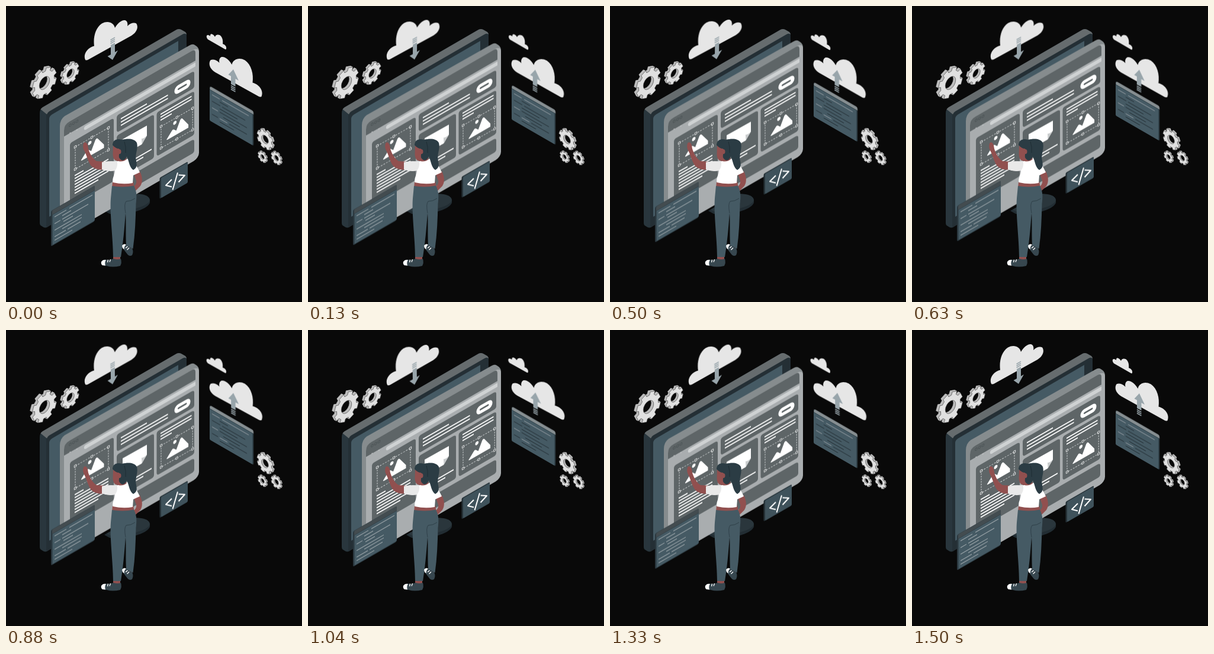
These frames come from a looping animation (500 px wide and 500 px high, 1540 ms). An HTML page:

```html
<!DOCTYPE html>
<html lang="en">
<head>
<meta charset="utf-8">
<title>Web design</title>
<style>
html, body { margin: 0; width: 100%; height: 100%; overflow: hidden; background: #090909; }
svg { display: block; width: 100vw; height: 100vh; }
.float { animation: float 1540ms linear infinite; }
.wind { animation: wind 1540ms linear infinite; transform-origin: 282px 89px; }
@keyframes float {
  0%, 97.4%, 100% { transform: translateY(0); }
  48.7% { transform: translateY(-10px); }
}
@keyframes wind {
  0%, 97.4%, 100% { transform: rotate(0deg); }
  24.35% { transform: rotate(1deg); }
  73.05% { transform: rotate(-1deg); }
}
.line { fill: none; stroke: #fff; stroke-width: 2; }
.card { fill: #5e6567; }
.skin { fill: #91504f; }
.dash { fill: none; stroke: #dfe2e3; stroke-width: .9; stroke-dasharray: 2.6 1.8; }
.knob { fill: #5e6567; stroke: #fff; stroke-width: .7; }
</style>
</head>
<body>
<svg viewBox="0 0 500 500">
  <defs>
    <path id="cloud" d="M134 91C130 83 136 71 149 67.500C147 53 151 37 162 29.500C172 24 182 28 184 37C188 29 196 23 201 24C205 25 206 30 205 34C211 28 219 27 221 31C224 38 219 46 212 50L140 90Q136 92.500 134 91z"/>
    <g id="pick">
      <rect class="dash" width="56" height="37.5"/>
      <path class="knob" d="M-1.7-1.7h3.4v3.4h-3.4zM26.3-1.7h3.4v3.4h-3.4zM54.3-1.7h3.4v3.4h-3.4zM-1.7 35.8h3.4v3.4h-3.4zM26.3 35.8h3.4v3.4h-3.4zM54.3 35.8h3.4v3.4h-3.4z"/>
      <g fill="#fff">
        <circle cx="24.5" cy="7.5" r="3"/>
        <path d="M10 28L19 18.500Q21 16.500 23 18.500L27 22.500L34 8Q36 5 38 8L48.500 24V29.500H12Q9 29.500 10 28z"/>
      </g>
    </g>
  </defs>

  <g id="gears"></g>

  <g class="wind">
    <g fill="#e6e6e6">
      <use href="#cloud"/>
      <use href="#cloud" transform="translate(565.5 62) scale(-1 1)"/>
      <use href="#cloud" transform="translate(422 38) scale(-.375 .385)"/>
    </g>
    <g fill="#98a5ab" stroke="#98a5ab">
      <path stroke="none" d="M177 66L184 62V78L189 75L180 91L171.500 85L177 82z"/>
      <path stroke-width="1.500" d="M176.500 57.500l7.500-4.300m-7.500 7.300l7.500-4.300m-7.500 7.300l7.500-4.300"/>
      <path stroke="none" d="M380 132L387.500 136V123L393 126L384 107L375.500 116L380 118.500z"/>
      <path stroke-width="1.500" d="M380 134.500l7.500 4.300m-7.500-1.300l7.500 4.300m-7.500-1.300l7.500 4.300"/>
    </g>
  </g>

  <!-- monitor -->
  <path fill="#29363d" d="M57 181Q57 174 62 171L288 40Q292 38 296 40L303 44Q305 46 305 50V232L72 372Q68 376 63 373.500L59 371Q57 370 57 366z"/>
  <path fill="#242f35" d="M68 185Q68 180 73 177L299 47Q305 44 305 52V232L72 372Q69 374 68 373z"/>
  <path fill="#666c6e" d="M58.500 174.500Q60 172 62 171L288 40Q292 38 296 40L303 44Q305 46 305 48Q302 45.500 298 48L73 178Q70 180 69 183z"/>
  <path fill="#455a64" d="M73 191Q73 186 78 183L291 59V230L73 356z"/>
  <path fill="#222d33" d="M166 346L215 318Q242 317 243 328V332Q241 341 216 348Q190 355 175 351z"/>
  <path fill="#2a363c" d="M170 344L215 317Q242 317 243 328Q241 337 214 343Q190 349 175 347z"/>

  <g class="float">
    <!-- browser window -->
    <path fill="#868c8e" d="M91 203Q91 192 99 186L310 66.500Q315 63.500 319 66L322 68Q326 71 326 77V242L104 380L91 372z"/>
    <g transform="matrix(1 -.577 0 1 0 0)">
      <rect x="98" y="257" width="228" height="188" rx="9" fill="#a9adaf"/>
      <path class="card" d="M98 277V267Q98 257 107 257H314Q320 257 320 264V277z"/>
      <path stroke="#cfd2d3" stroke-width="6.500" d="M135 283.500H320"/>
      <circle cx="135" cy="283.500" r="3.250" fill="#cfd2d3"/>
      <g fill="none" stroke="#4a5254" stroke-width=".8">
        <circle cx="108.500" cy="264" r="1.900"/><circle cx="114.200" cy="264" r="1.900"/><circle cx="119.900" cy="264" r="1.900"/>
      </g>
      <path stroke="#c6c9ca" stroke-width="1.500" d="M107.500 277h1.500M119 278.500h1.500"/>
      <rect class="card" x="108" y="294" width="74" height="107" rx="4"/>
      <rect class="card" x="187" y="293" width="131" height="29" rx="4"/>
      <rect class="card" x="187" y="327" width="63" height="74" rx="4"/>
      <rect class="card" x="254.500" y="327" width="63.500" height="74" rx="4"/>
      <rect class="card" x="187" y="408" width="131" height="23" rx="4"/>
      <path class="line" d="M194 302.500h44M194 308.200h79.500M194 313.800h79.500M261 333.500h52.500M261 338.500h52.500M261 343.500h19M116 353.500h15M116 358.500h57M116 363.500h57M116 368.500h57M116 373.500h57M116 378.500h57M116 383.500h40M196 384h50M196 389h36"/>
      <rect x="284.500" y="301.500" width="27" height="14" rx="6.500" fill="#fff"/>
      <path stroke="#5e6567" stroke-width="3" stroke-linecap="round" d="M291.500 308.500h12.500"/>
      <use href="#pick" x="117" y="305.500"/>
      <use href="#pick" transform="translate(262 354.500) scale(.95 .975)"/>
    </g>
    <path fill="#fff" d="M197 225L238 202V219L229 234L197 252z"/>
    <path fill="#c9cccd" d="M238 218L229.500 234L229 224Q234 224 238 218z"/>

    <!-- left code panel -->
    <g transform="matrix(1 -.577 0 1 0 0)">
      <rect x="76" y="390" width="74" height="60" rx="2.500" fill="#2b383f"/>
      <path fill="#455a64" d="M78.500 398H150V446.500Q150 449 148 449H78.500z"/>
      <path fill="#434c50" d="M78 397.500V392Q78 390.500 80 390.500H148Q150 390.500 150 393V397.500z"/>
      <path fill="none" stroke="#929da2" stroke-width="1.400" d="M82 403.500h20M107 403.500h39M95 409h15M82 415h10M95 415h44M97 420h16M82 426h15M97 426h31M95 431h33M82 437h19M104 437h22M82 443h30"/>
    </g>

    <!-- code tile -->
    <g transform="matrix(1 -.577 0 1 0 0)">
      <rect x="259.500" y="440" width="47.500" height="35.500" rx="2" fill="#263238"/>
      <rect x="262" y="441.500" width="45" height="34" rx="1.500" fill="#3f525b"/>
    </g>
    <path class="line" stroke-linejoin="round" d="M280 293L270 303L280 305.500M281.500 310.500L290 281.500M291.500 285.500L302 286L291.500 297.500"/>

    <!-- right code panel -->
    <g transform="matrix(1 .577 0 1 0 0)">
      <rect x="344" y="-63" width="74" height="58" rx="2.500" fill="#33444c"/>
      <path fill="#455a64" d="M344 -57H416V-5H346Q344 -5 344 -7z"/>
      <path fill="#868e91" d="M344.500 -58V-61Q345 -63.500 347 -63.500H416Q418 -63.500 418 -61V-58z"/>
      <path fill="none" stroke="#7f8b91" stroke-width="1.300" d="M348 -51h13M365 -51h45M348 -29h10M361 -18h13"/>
      <path fill="none" stroke="#222d33" d="M361 -46h14M348 -40h14M365 -40h39M361 -34.500h30M361 -29h46M367 -23.500h28M348 -18h10M377 -18h30M361 -12.500h24"/>
    </g>
  </g>

  <!-- woman -->
  <path class="skin" d="M130.500 234C131 229.500 135 229 137 233C139 236 138 240 140 244C143 252 147 258 153 262L167 263V276C157 278 148 275 143 269C138 261 136 251 132 244C130 240 130 237 130.500 234z"/>
  <path class="skin" d="M216 284L226 279C231 289 231 298 227 304L217 314L212 308C218 304 221 300 220 295z"/>
  <path class="skin" d="M180 297H215L217 307H179zM181 421h12v9h-12zM203 402l11 4-2 9-9-5z"/>
  <path fill="#455a64" d="M179 304Q198 307 216 303.500C221 313 221 322 219.500 334C219 360 218 385 214.500 410L203 404C202 385 203 366 202 350C200 375 198 400 194 424H181C181 395 175 350 177 325z"/>
  <path fill="none" stroke="#2f4049" d="M218 325Q211 330 203 330Q199 334 202 350"/>
  <path class="skin" d="M181 235L180.500 251Q181 261 188 261.500L189 267L205 265L201 248L191 234z"/>
  <path fill="#fff" d="M162 264C172 261.500 182 263 190 262Q198 264 205 258C214 259 220 268 226 281L215 286L214 299Q198 302 180.500 298C179 290 184 285 184 278Q172 280 162 276z"/>
  <path fill="#e9e9e9" d="M162 264Q175 261 188 263Q189 272 184 278Q172 280 162 276z"/>
  <path fill="#2b3c44" d="M180 235C180 226 188 223 196 226C205 224 216 223 221 231C224 242 217 250 220 262C221 268 222 273 215 277C208 272 208 262 204 254C201 262 195 263 191 256C190 251 193 246 191 241C187 241 184 239 180 235z"/>
  <path fill="none" stroke="#1f2d33" d="M200 229Q203 238 202 248"/>
  <ellipse class="skin" cx="191.500" cy="246" rx="3" ry="4"/>
  <path fill="#37474f" d="M161 432Q165 427 173 429L182 427Q188 429 194 427Q196 434 193 439Q180 442 170 439L163 438Q160 436 161 432zM196 405Q199 400 204 404L213 409Q216 415 213 421Q208 424 204 418L197 409z"/>
  <path fill="#fff" d="M161 432Q164 427.500 169 429Q166 433 168 438.500L163 438Q160 436 161 432zM196 405Q198 401 203 403Q199 406 200 411L197 409z"/>
  <path fill="none" stroke="#fff" stroke-width="1.300" d="M171.500 433l1-4.500M175 432.500l1.500-4.500M202 409l3.500-3M204.500 412l3.500-3.500"/>
</svg>
<script>
const layer = document.getElementById('gears');

function gearPath(r) {
  const pts = [], teeth = 8;
  for (let i = 0; i < teeth; i++) {
    const mid = i * 2 * Math.PI / teeth + 0.35;
    for (const [k, da] of [[.8, -.25], [1, -.2], [1, .2], [.8, .25]]) {
      pts.push([r * k * Math.cos(mid + da), r * k * Math.sin(mid + da)].map(n => n.toFixed(2)));
    }
  }
  const h = r * .42;
  return `M${pts.join('L')}zM${-h} 0a${h} ${h} 0 1 0 ${2 * h} 0a${h} ${h} 0 1 0 ${-2 * h} 0z`;
}

// side: -1 faces left, 1 faces right
function gear(x, y, r, side, depth) {
  const d = gearPath(r);
  const slice = (k, fill, line) =>
    `<path d="${d}" fill-rule="evenodd" fill="${fill}" stroke="${line}" stroke-width=".6"
      transform="matrix(.866 ${side * .5} 0 1 ${x + side * k} ${y - k / 2})"/>`;
  let out = '';
  for (let k = depth; k > 0; k -= .5) out += slice(k, '#bdbdbd', k === depth ? '#3a3a3a' : '#bdbdbd');
  layer.insertAdjacentHTML('beforeend', out + slice(0, '#e0e0e0', '#3a3a3a'));
}

gear(65, 130, 24, -1, 4);
gear(109, 114, 17, -1, 3);
gear(437.5, 225.5, 16, 1, 2.5);
gear(433, 255, 9, 1, 1.5);
gear(456.5, 257, 10.5, 1, 1.5);
</script>
</body>
</html>
```
